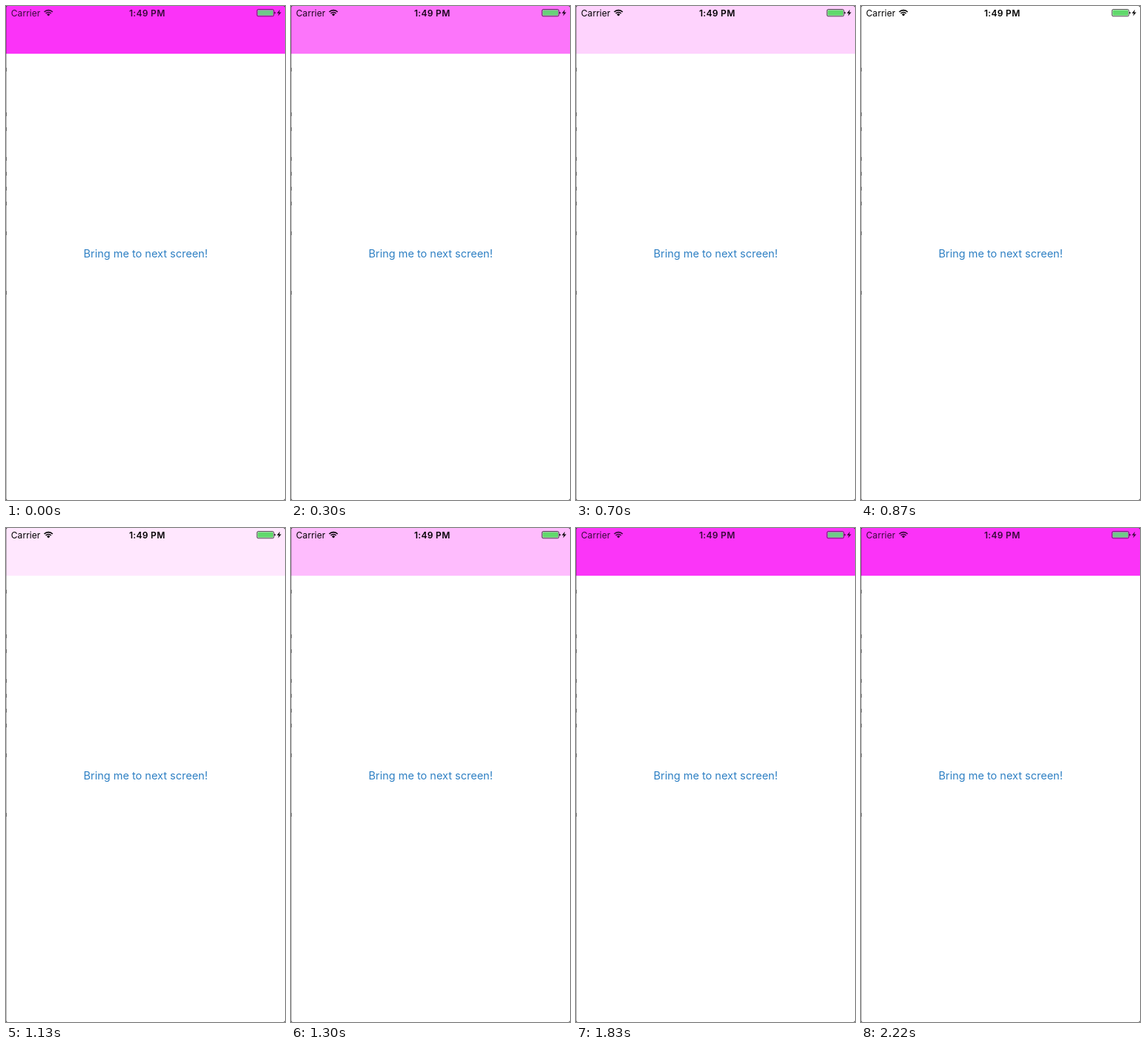
Recreate the animation shown at these times as an HTML page with a canvas. Size 376 by 664 pixels, loop 2.27 s.

```html
<!DOCTYPE html>
<html lang="en">
<head>
<meta charset="utf-8">
<title>Fading navigation bar</title>
<style>
html, body { margin: 0; width: 100%; height: 100%; overflow: hidden; background: #fff; }
canvas { display: block; }
</style>
</head>
<body>
<canvas id="stage" width="376" height="664"></canvas>
<script>
const W = 376, H = 664, LOOP = 2270;
const ctx = document.getElementById('stage').getContext('2d');
const FONT = 'Inter, Roboto, sans-serif';

// time in ms, opacity of the bar
const FADE = [[0, 1], [300, 0.676], [520, 0.446], [870, 0], [1038, 0],
              [1300, 0.328], [1570, 0.667], [1840, 1], [LOOP, 1]];

function opacityAt(t) {
  let i = 1;
  while (t > FADE[i][0]) i++;
  const [t0, a0] = FADE[i - 1], [t1, a1] = FADE[i];
  return a0 + (a1 - a0) * (t - t0) / (t1 - t0);
}

function mix(from, to, k) {
  return `rgb(${from.map((v, i) => Math.round(v + (to[i] - v) * k)).join(',')})`;
}

function rect(x, y, w, h, color) {
  ctx.fillStyle = color;
  ctx.fillRect(x, y, w, h);
}

function label(text, x, y, size, weight, spacing, color) {
  ctx.font = `${weight} ${size}px ${FONT}`;
  ctx.letterSpacing = spacing + 'px';
  ctx.fillStyle = color;
  ctx.fillText(text, x, y);
}

function wifi(x, y, ink) {
  const from = -Math.PI * 0.75, to = -Math.PI * 0.25;
  ctx.strokeStyle = ctx.fillStyle = ink;
  ctx.lineWidth = 1.6;
  for (const r of [8, 5.1]) {
    ctx.beginPath();
    ctx.arc(x, y, r, from, to);
    ctx.stroke();
  }
  ctx.beginPath();
  ctx.moveTo(x, y);
  ctx.arc(x, y, 3.1, from, to);
  ctx.fill();
}

function battery(ink, green) {
  ctx.strokeStyle = ink;
  ctx.lineWidth = 0.7;
  ctx.beginPath();
  ctx.roundRect(338.2, 4.6, 22.8, 9.2, 1.8);
  ctx.stroke();
  ctx.fillStyle = green;
  ctx.beginPath();
  ctx.roundRect(339.2, 5.6, 20.8, 7.2, 0.8);
  ctx.fill();
  ctx.fillStyle = ink;
  ctx.beginPath();
  ctx.arc(361.7, 9.2, 1.4, -Math.PI / 2, Math.PI / 2);
  ctx.fill();
}

function bolt(ink) {
  ctx.fillStyle = ink;
  ctx.beginPath();
  for (const [x, y] of [[369.3, 4.8], [365, 9.7], [367.7, 9.7], [366.6, 13.4], [371, 8.4], [368.2, 8.4]]) {
    ctx.lineTo(x, y);
  }
  ctx.fill();
}

// shaded sliver of the screen underneath
function leftEdge() {
  rect(0, 0, 1, H, 'rgba(0, 0, 0, 0.285)');
  for (const y of [85, 145, 165, 205, 225, 245, 265, 305, 385]) rect(0, y - 2, 1, 5, '#666');
}

function corner(x, y, sx, sy) {
  ctx.fillStyle = '#333';
  ctx.beginPath();
  ctx.moveTo(x, y);
  ctx.lineTo(x + 2.5 * sx, y);
  ctx.quadraticCurveTo(x, y, x, y + 2.5 * sy);
  ctx.fill();
}

function draw(t) {
  const a = opacityAt(t);
  const tint = Math.max(0, (a - 0.4) / 0.6);
  const ink = mix([0, 0, 0], [56, 10, 58], tint);

  rect(0, 0, W, H, '#fff');
  rect(0, 0, W, 64.2, mix([255, 255, 255], [251, 51, 248], a));
  leftEdge();

  label('Carrier', 6.8, 13.5, 12, 400, 0.05, ink);
  label('1:49 PM', 166, 13.5, 12, 600, 0.3, ink);
  wifi(57.2, 13.6, ink);
  battery(ink, mix([97, 217, 108], [112, 200, 138], tint));
  bolt(ink);

  label('Bring me to next screen!', 104.6, 338.4, 14.5, 400, 0, '#2f80c4');

  corner(0, 0, 1, 1);
  corner(W, 0, -1, 1);
  corner(0, H, 1, -1);
  corner(W, H, -1, -1);
}

const start = performance.now();
function tick() {
  draw((performance.now() - start) % LOOP);
  requestAnimationFrame(tick);
}
tick();
</script>
</body>
</html>
```
